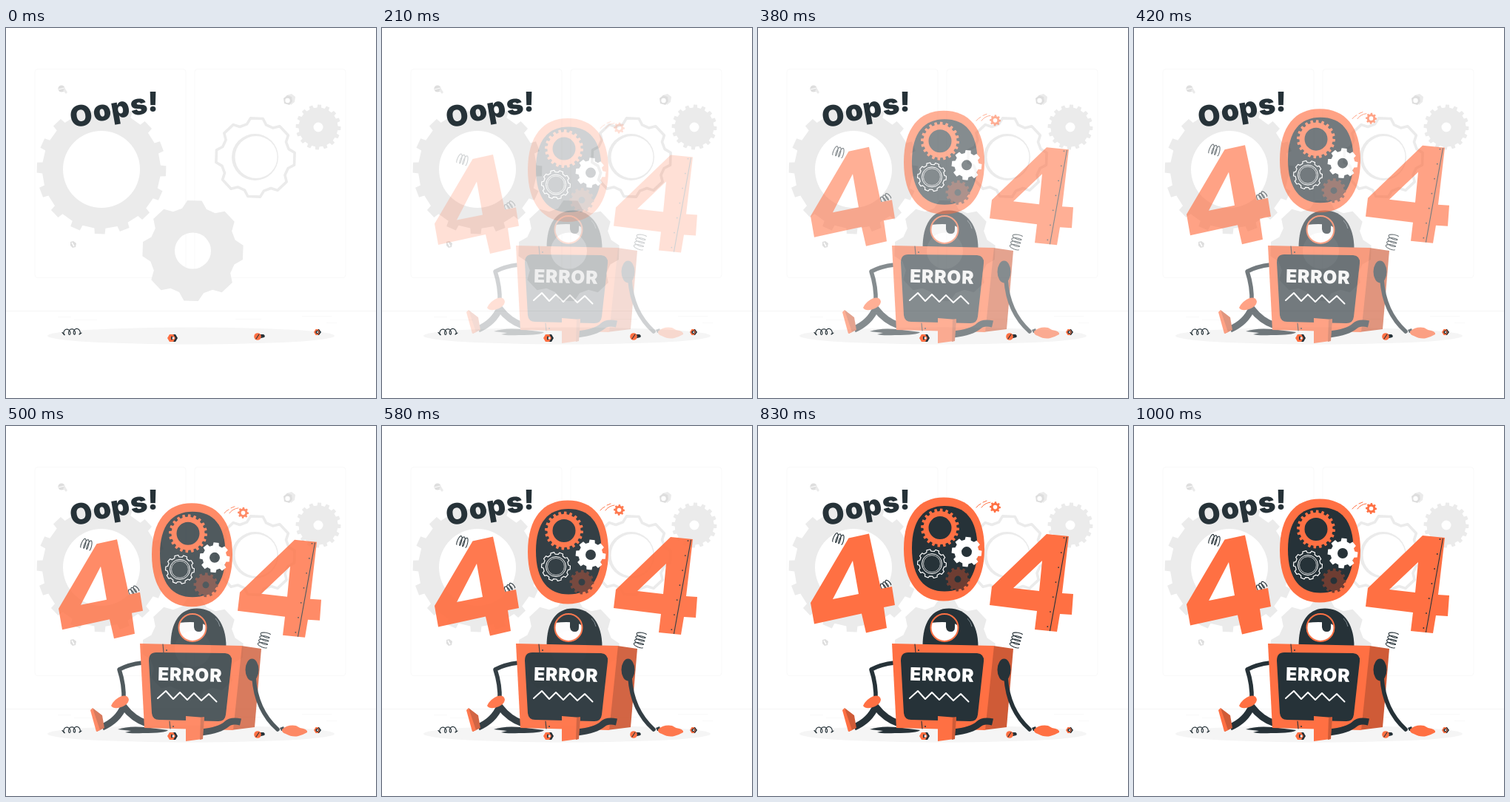
An HTML page that plays this animation: 500 by 500 pixels, repeating every 1.04 s.

```html
<!DOCTYPE html>
<html lang="en">
<head>
<meta charset="utf-8">
<title>404 robot</title>
<style>
  html, body { margin: 0; width: 100%; height: 100%; overflow: hidden; background: #fff; }
  svg { display: block; width: 100%; height: 100%; }
  text { font: 900 39px Inter, Roboto, sans-serif; text-anchor: middle; }
  .ink { fill: #263238; }
  .hot { fill: #ff7043; }
  .dim { fill: #cf5b37; }
  .pale { fill: #ebebeb; }
  .line { fill: none; stroke: #263238; stroke-width: 1.1; stroke-linecap: round; stroke-linejoin: round; }
  .limb { fill: none; stroke: #263238; stroke-width: 5.6; stroke-linejoin: round; }
  .thick { stroke-width: 9; }
  .faint { fill: none; stroke: #f9f9f9; }
  #error { font-size: 24.5px; letter-spacing: .8px; fill: #fff; }
</style>
</head>
<body>
<svg viewBox="0 0 500 500">
  <!-- wall and floor -->
  <g class="faint">
    <rect x="39" y="55.5" width="204" height="282" rx="4"/>
    <rect x="255" y="55.5" width="204" height="282" rx="4"/>
    <path d="M0 382.5H500" stroke="#f4f4f4"/>
    <path d="M70 390.5H88M92 394.5H123M310 393.5H345M400 389.5H440M433 398.5H447"/>
  </g>
  <ellipse cx="250" cy="416" rx="194" ry="11.5" fill="#f5f5f5"/>

  <!-- background gears: cx cy outer root teeth phase hole top base -->
  <g class="pale" fill-rule="evenodd">
    <path data-gear="129 191 87.5 80 16 1.5 52 .2 .24"/>
    <path data-gear="252.5 301 68.5 59 8 2 24.5 .18 .36"/>
    <path data-gear="422 134 30.5 26.5 16 3 6.5 .2 .27"/>
    <path data-gear="337 175 53.5 46.5 8 2 0 .2 .36" fill="none" stroke="#ebebeb" stroke-width="3.6" stroke-linejoin="round"/>
    <circle cx="336.5" cy="174.5" r="31.5"/>
    <circle cx="338" cy="174.5" r="28.5" fill="#fff"/>
  </g>

  <!-- loose hardware on the wall -->
  <g fill="#dedede">
    <circle cx="75" cy="82" r="4.6"/>
    <path d="M77 84l3-2 3 5-2 2z" fill="#ebebeb"/>
    <path d="M71 83l8-2" stroke="#fff"/>
    <path d="M379 91l7-2 5 4-1 7-5 4z" fill="#ebebeb"/>
    <path d="M375 95l5-4 6 2 1 6-4 5-7-2z"/>
    <circle cx="380.5" cy="98" r="3.2" fill="#fff"/>
    <path d="M87 289l4-1 4 3-1 5-4 1-3-3z"/>
    <path d="M89 290l3 5" stroke="#fff" stroke-width="1.5"/>
  </g>

  <g class="ink">
    <text transform="translate(104 132) rotate(-11)">O</text>
    <text transform="translate(132 125) rotate(-11)">o</text>
    <text transform="translate(156.5 121) rotate(-10)">p</text>
    <text transform="translate(181 117) rotate(-8)">s</text>
    <text transform="translate(198.5 112.5)" style="font-size:37px">!</text>
  </g>

  <!-- hardware on the floor -->
  <path class="line" data-spring="79 411 99 410 3 3.8"/>
  <path class="line" d="M76 411.500l3 3M99 414l3-2"/>
  <path class="ink" d="M222 414h7l3 5-3 5h-7z"/>
  <path class="hot" d="M221 414h5l3 5-3 5h-5l-3-5z"/>
  <path d="M223 416.500l3 1v3l-3 1z" class="ink"/>
  <circle cx="226" cy="419" r="1.500" fill="#fff"/>
  <path class="ink" d="M341 414l7 0q3 2 1 4l-8 2z"/>
  <circle class="hot" cx="340" cy="417" r="4.800"/>
  <path class="line" d="M338 420l4-6"/>
  <path class="ink" d="M419 407h4l3 4-3 4h-4z"/>
  <path class="hot" d="M418.500 407h3l2.500 4-2.500 4h-3l-2.500-4z"/>
  <circle class="ink" cx="420.500" cy="411" r="2.200"/>
  <circle cx="421" cy="411" r="1" fill="#fff"/>

  <g id="robot" opacity="0">
    <path class="ink" d="M151 410q14-5 36-3l32 4q-3 4-34 4q-16 1-24-1l8-2z"/>
    <path class="limb" d="M184 320Q166 322 153 329Q160 350 159 371"/>
    <path class="limb thick" d="M130 407Q151 398 159 379Q172 396 190 402"/>
    <path class="hot" d="M142 378q4-9 14-13q9-2 10 5q-1 6-8 9q-12 5-16-1z"/>
    <path class="dim" d="M117 381l13 10 3 17-10 5z"/>
    <path class="hot" d="M117 381l-3 3 8 29 5-2z"/>

    <path class="ink" d="M222.500 297C222.500 265 235 246.500 258 246.500C283 246.500 297.500 268 297.500 298z"/>
    <path d="M283 260q5 5 6 11" fill="none" stroke="#78848a"/>
    <circle cx="252" cy="272.500" r="18.500" fill="#fff"/>
    <path class="ink" d="M233.500 268A18.500 18.500 0 0 1 270.500 270Q263 263 233.500 266z"/>
    <path class="ink" d="M254 264h12v8q0 6-5.500 6q-5.500 0-6.500-6z"/>
    <circle cx="252" cy="272.500" r="18.500" fill="none" stroke="#ff7043" stroke-width="2"/>

    <path class="dim" d="M318 297l27 4-9 106-32 4z"/>
    <path class="hot" d="M181 294l138 3-12 114-120-3z"/>
    <path class="ink" d="M203 306l93 1q10 1 9 11l-8 72q-1 9-10 9l-80-2q-9 0-10-9l-4-71q0-11 10-11z"/>
    <path class="line" d="M212 295l1 11M221 399l1 10"/>
    <g class="ink"><circle cx="217" cy="303" r="1"/><circle cx="226" cy="406" r="1"/></g>
    <text id="error" transform="translate(248.500 344.800) rotate(1.500)">ERROR</text>
    <path d="M205 368l11-10 10 11 9-9 10 10 9-9 10 10 10-9 10.500 10.500" fill="none" stroke="#fff" stroke-width="2" stroke-linecap="round" stroke-linejoin="round"/>

    <path class="limb thick" d="M264 414Q289 411 298 403Q304 397 317 400"/>
    <path class="hot" d="M243 392l25 2-3 29-22 3z"/>
    <path class="dim" d="M268 393l-5 1-1 30 4-1z"/>
    <ellipse class="ink" cx="332.500" cy="329.500" rx="9" ry="15"/>
    <path class="limb" stroke-linecap="round" d="M335 340Q338 384 367 410"/>
    <path class="ink" d="M370 408l5-2 2 6-5 0z"/>
    <path class="hot" d="M373 410q8-7 19-5q4 3 10 4q6 2 5 5q-5 3-12 5q-8 2-17-3q-6-2-5-6z"/>
    <path class="line" data-spring="346 298 351 280 4 6.500"/>
  </g>

  <g id="digits" opacity="0">
    <path class="line" data-spring="103 152 115 156 3 6.500"/>
    <path class="line" data-spring="167 220 177 213 3 4.500"/>
    <path class="hot" fill-rule="evenodd" d="M122.500 153.500L150 147.500L166 222L181 219L185 244L170 247L174 275L146 281.500L140 255.500L76 269.500L71 241zM128 184l-27 52 35-7z"/>
    <path class="hot" fill-rule="evenodd" d="M390 148l30 3-9 77 15 1-2 28-16-1-4 24-30-3 3-25-64-8 3-25zM384 184l-39 37 35 4z"/>
    <path class="line" d="M417.500 152L394.500 278.500"/>
    <g class="ink" id="rivets"></g>

    <path class="hot" d="M251 98.500C285 98.500 306 122 306 168C306 214 285 238.500 251 238.500C218 238.500 197 214 197 168C197 122 218 98.500 251 98.500z"/>
    <path class="ink" d="M252 110C280 110 296.500 128 296.500 167C296.500 207 280 225.500 252 225.500C225 225.500 208 207 208 167C208 128 225 110 252 110z"/>
    <g fill-rule="evenodd">
      <path class="hot" data-gear="246 139.500 26 22.500 20 4 15.500 .2 .28"/>
      <g fill="none" stroke="#fff" stroke-linejoin="round">
        <path data-gear="235 188 19.500 17 10 4 0 .2 .3" stroke-width="1.200"/>
        <circle cx="235" cy="188" r="13.500"/>
        <circle cx="235" cy="188" r="11.500" stroke-width=".7"/>
      </g>
      <path data-gear="282 172 20.500 16.500 8 6 7 .22 .32" fill="#fff"/>
      <path data-gear="270 209 16.500 13.500 12 3 4.500 .2 .28" fill="#6e3d32"/>
      <path class="hot" data-gear="320.500 111.500 7.500 5.800 8 4 2.800 .2 .3"/>
    </g>
    <path d="M295 112q2-3 6-5M302 112q4-6 12-7M304 105l5-2" fill="none" stroke="#ff7043" stroke-linecap="round"/>
  </g>
</svg>
<script>
const $ = id => document.getElementById(id);

function gear([cx, cy, outer, root, teeth, phase, hole, top, base]) {
  const pitch = 2 * Math.PI / teeth, points = [];
  for (let i = 0; i < teeth; i++) {
    for (const [r, off] of [[root, -base], [outer, -top], [outer, top], [root, base]]) {
      const a = phase * Math.PI / 180 + (i + off) * pitch;
      points.push(`${cx + r * Math.cos(a)} ${cy + r * Math.sin(a)}`);
    }
  }
  const ring = hole
    ? `M${cx - hole} ${cy}a${hole} ${hole} 0 1 0 ${2 * hole} 0a${hole} ${hole} 0 1 0 ${-2 * hole} 0z` : '';
  return `M${points.join('L')}z${ring}`;
}

// a coil seen from the side: x0 y0 x1 y1 turns radius
function spring([x0, y0, x1, y1, turns, radius]) {
  const dx = x1 - x0, dy = y1 - y0, len = Math.hypot(dx, dy), points = [];
  for (let i = 0; i <= turns * 20; i++) {
    const a = i / 20 * 2 * Math.PI;
    const along = i / (turns * 20) - .4 * Math.sin(a) / turns;
    const side = radius * Math.cos(a) / len;
    points.push(`${x0 + dx * along - dy * side} ${y0 + dy * along + dx * side}`);
  }
  return `M${points.join('L')}`;
}

function build(kind, path) {
  for (const el of document.querySelectorAll(`[data-${kind}]`))
    el.setAttribute('d', path(el.dataset[kind].split(' ').map(Number)));
}
build('gear', gear);
build('spring', spring);

$('rivets').innerHTML = Array.from({ length: 7 }, (_, i) =>
  `<circle cx="${413.5 - i * 3.7}" cy="${153 + i * 20}" r=".9"/>`).join('');

// cubic-bezier(.36, -.01, .5, 1.38), solved by bisection
const cubic = (a, b, s) => 3 * (1 - s) ** 2 * s * a + 3 * (1 - s) * s * s * b + s ** 3;
function ease(x) {
  let lo = 0, hi = 1;
  for (let i = 0; i < 24; i++) {
    const mid = (lo + hi) / 2;
    if (cubic(.36, .5, mid) < x) lo = mid; else hi = mid;
  }
  return cubic(-.01, 1.38, lo);
}

// the picture advances 24 times a second, after a first hold of 80 ms
const LOOP = 1040, HOLD = 80, STEP = 1000 / 24;
function draw(now) {
  const t = now % LOOP;
  const held = t < HOLD ? 0 : HOLD + Math.floor((t - HOLD + 4) / STEP) * STEP;
  const p = held ? ease(Math.min(1, (held + 37) / 1000)) : 0;
  const alpha = Math.max(0, Math.min(1, p));
  $('robot').setAttribute('opacity', alpha);
  $('digits').setAttribute('opacity', alpha);
  $('digits').setAttribute('transform', `translate(0 ${30 * (1 - p)})`);
}
const start = performance.now();
function tick() {
  draw(performance.now() - start);
  requestAnimationFrame(tick);
}
tick();
</script>
</body>
</html>
```
